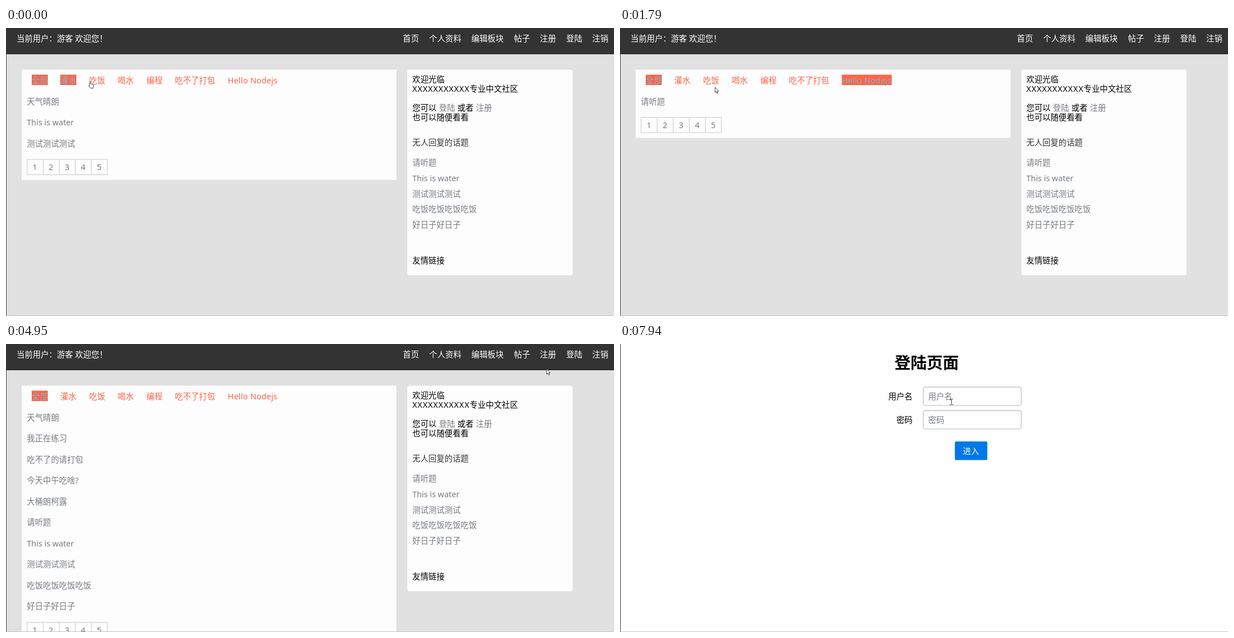
Recreate the animation shown at these times as an HTML page. Size 1087 px wide and 515 px high, loop 8000 ms.

```html
<!DOCTYPE html>
<html lang="zh-CN">
<head>
<meta charset="utf-8">
<style>
html, body { margin: 0; width: 100%; height: 100%; overflow: hidden; background: #fefefe; }
svg { display: block; font: 14.4px "Noto Sans", "Noto Sans CJK SC", sans-serif; }
</style>
</head>
<body>
<svg id="stage" width="1087" height="515" viewBox="0 0 1087 515"></svg>
<script>
const LOOP = 8000, GREY = '#777b80', TOMATO = '#ff6347';
const LOGIN = -1;

const tabs = [['全部', 46], ['灌水', 97], ['吃饭', 148.5], ['喝水', 199.5], ['编程', 251],
  ['吃不了打包', 302], ['Hello Nodejs', 396.5]];
const all = ['天气晴朗', '我正在练习', '吃不了的请打包', '今天中午吃啥?', '大桶朗柯露', '请听题',
  'This is water', '测试测试测试', '吃饭吃饭吃饭吃饭', '好日子好日子'];
const topics = { 0: all, 1: [all[0], all[6], all[7]], 2: [all[3], all[8]], 6: [all[5]] };
const unanswered = [5, 6, 7, 8, 9].map(i => all[i]);

// time, view (tab index or LOGIN), cursor x, y, cursor kind
const steps = [
  [0, 1, 147, 95, 'hand'], [140, 1, 150, 96, 'hand'], [265, 1, 152, 96, 'hand'],
  [390, 2, 152, 96, 'hand'], [515, 2, 158, 97, 'hand'], [640, 2, 186, 101, 'arrow'],
  [790, 2, 310, 101, 'hand'], [920, 2, 397, 97, 'arrow'], [1070, 2, 401, 97, 'hand'],
  [1520, 2, 359.5, 114.5, 'arrow'], [1640, 2, 240, 110, 'arrow'],
  [1790, 6, 170, 106, 'arrow'], [1910, 6, 122, 102, 'arrow'],
  [2060, 6, 90, 97, 'arrow'], [2180, 6, 75, 94, 'arrow'], [2330, 6, 53, 93, 'hand'],
  [2750, 6, 63, 95, 'hand'], [2900, 6, 674.5, 97.5, 'arrow'], [3050, 0, 779, 86, 'beam'],
  [3200, 0, 800, 68, 'arrow'], [3320, 0, 810, 60, 'arrow'], [3470, 0, 794, 57, 'arrow'],
  [3590, 0, 784.5, 56.5, 'arrow'], [4370, 0, 832.5, 48.5, 'arrow'], [4520, 0, 885.5, 48.5, 'arrow'],
  [4670, 0, 927, 48, 'arrow'], [4820, 0, 950, 46, 'arrow'], [4950, 0, 966.5, 44.5, 'arrow'],
  [5960, 0, 968.5, 43.5, 'arrow'], [6110, 0, 969, 27, 'hand'], [6270, 0, 995.5, 25, 'arrow'],
  [6410, 0, 1003, 24, 'hand'], [6980, 0, 930, 60, 'arrow'], [7100, 0, 740, 105, 'arrow'],
  [7230, 0, 580, 132, 'arrow'], [7370, 0, 499.5, 151.5, 'arrow'],
  [7520, LOGIN, 437.5, 159.5, 'arrow'], [7680, LOGIN, 480, 140, 'arrow'],
  [7810, LOGIN, 555, 112, 'beam'], [7940, LOGIN, 592.5, 103.5, 'beam']
];

// Baselines snap to whole pixels, as in page text.
const text = (s, x, y, fill = '#000', extra = '') =>
  `<text x="${x}" y="${Math.round(y)}" fill="${fill}" ${extra}>${s}</text>`;
const rect = (x, y, w, h, fill, extra = '') =>
  `<rect x="${x}" y="${y}" width="${w}" height="${h}" fill="${fill}" ${extra}/>`;
const path = (d, extra) => `<path d="${d}" ${extra}/>`;

const outline = 'fill="#fff" stroke="#333" stroke-width=".9" stroke-linejoin="round"';
const cursors = {
  arrow: path('M0 0V9.5L2.2 7.6L3.8 11L5.2 10.4L3.7 7.1H6.6Z', outline),
  hand: path('M2.5 8V1.6Q3.5.2 4.5 1.6V5L8.6 6Q9.7 6.4 9.4 8L8.6 12.6H4L.9 8.6Q.6 7 2.5 8Z', outline),
  beam: path('M-3-5H-.7L0-4.3L.7-5H3M0-4.3V4.3M-3 5H-.7L0 4.3L.7 5H3', 'fill="none" stroke="#444"')
};

function header() {
  const nav = [['首页', 709.5], ['个人资料', 756.5], ['编辑板块', 832], ['帖子', 908],
    ['注册', 954.5], ['登陆', 1001.5], ['注销', 1048]];
  return rect(0, 0, 1087, 47, '#333') + text('当前用户：游客 欢迎您！', 19, 24, '#fff') +
    nav.map(([s, x]) => text(s, x, 24, '#fff')).join('');
}

function sidebar() {
  const x = 726.5;
  return rect(717.5, 74.5, 295.5, 367.5, '#fdfdfd', 'rx="4"') +
    text('欢迎光临', x, 97) +
    text('X'.repeat(11), x, 114, '#000', 'letter-spacing=".88"') + text('专业中文社区', 829, 114) +
    text('您可以', x, 148) + text('登陆', 774, 148, GREY) +
    text('或者', 807, 148) + text('注册', 840, 148, GREY) +
    text('也可以随便看看', x, 165) + text('无人回复的话题', x, 210, '#333') +
    unanswered.map((s, i) => text(s, x, 246.4 + 27.65 * i, GREY)).join('') +
    text('友情链接', x, 421);
}

function tab([s, x], on) {
  const latin = s.startsWith('H');
  const width = latin ? 89.3 : s.length * 14.4;
  return (on ? rect(x, 83.5, width, 18.5, TOMATO) : '') +
    text(s, x, 99, on ? '#7fb8d0' : TOMATO, latin ? 'letter-spacing=".25"' : '');
}

function pager(y) {
  let d = `M37.7 ${y + .7}h143.6v27.4h-143.6z`, digits = '';
  for (let i = 0; i < 5; i++) {
    const x = 37.7 + 28.75 * i;
    if (i) d += `M${x} ${y}v28`;
    digits += text(i + 1, x + 14, y + 19.6, GREY, 'text-anchor="middle"');
  }
  return path(d, 'fill="none" stroke="#d6d6d6" stroke-width="1.4"') + digits;
}

function board(view) {
  const list = topics[view], end = 121.5 + 37.55 * list.length;
  return rect(0, 0, 1087, 515, '#e1e1e1') + header() + sidebar() +
    rect(28, 74.5, 670, end + 37.5 - 74.5, '#fdfdfd') +
    tabs.map((t, i) => tab(t, i === 0 || i === view)).join('') +
    list.map((s, i) => text(s, 37.3, 136.5 + 37.55 * i, GREY)).join('') + pager(end);
}

function field(label, y) {
  return text(label, 523, y + 23, '#000', 'text-anchor="end"') +
    rect(542.2, y + .7, 175.2, 33.2, '#fefefe', 'rx="3.5" stroke="#c6c6c6" stroke-width="1.4"') +
    path(`M545 ${y + 2}H715`, 'stroke="#e4e4e4"') + text(label, 551, y + 23, GREY);
}

function login() {
  return rect(0, 0, 1087, 515, '#fefefe') +
    text('登陆页面', 490.7, 44, '#000', 'font-size="28.8" font-weight="700"') +
    field('用户名', 76) + field('密码', 118) +
    rect(598.7, 174.2, 58, 33.3, '#0078e7', 'rx="2"') + text('进入', 613, 196.5, '#fff');
}

const stage = document.getElementById('stage');
let shown;

function frame() {
  const t = performance.now() % LOOP;
  const step = steps.findLast(s => s[0] <= t);
  if (step !== shown) {
    shown = step;
    const [, view, x, y, kind] = step;
    stage.innerHTML = (view === LOGIN ? login() : board(view)) +
      rect(0, 0, 1, 515, '#39342f') + rect(0, 514, 1087, 1, '#c4c4c4') +
      `<g transform="translate(${x} ${y})">${cursors[kind]}</g>`;
  }
  requestAnimationFrame(frame);
}
frame();
</script>
</body>
</html>
```
